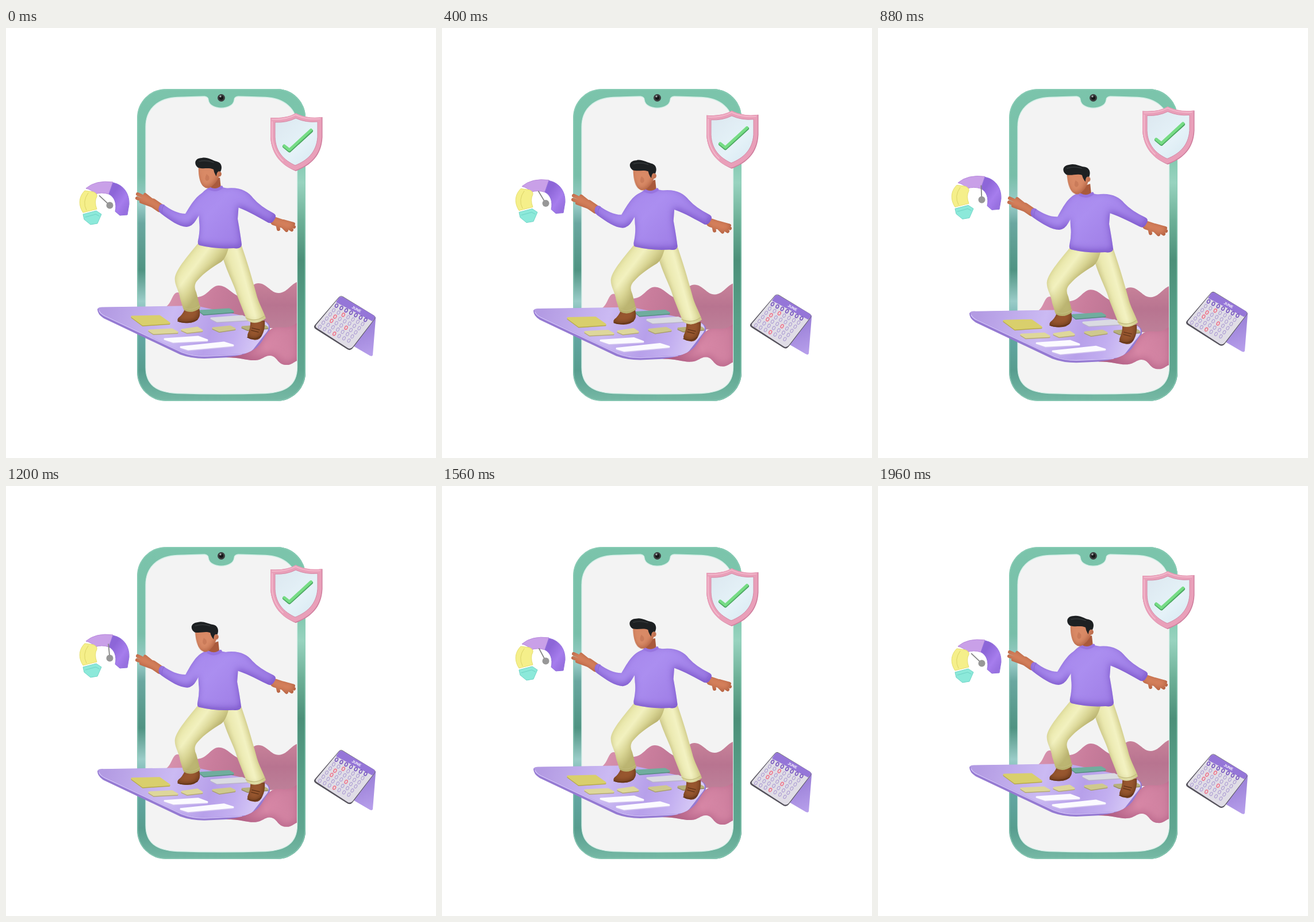
An HTML page that plays this animation: 748x748 px, repeating every 2 s.

```html
<!DOCTYPE html>
<html lang="en">
<head>
<meta charset="utf-8">
<title>Rider on a board</title>
<style>
html, body { margin: 0; width: 100%; height: 100%; overflow: hidden; background: #fff; }
svg { display: block; width: 100%; height: 100%; }
.line { fill: none; stroke-linecap: round; stroke-linejoin: round; }
</style>
</head>
<body>
<svg viewBox="0 0 748 748">
<defs id="defs">
  <clipPath id="rightHalf"><path d="M374 100H530V660H374Z"/></clipPath>
  <path id="screen" d="M298 120.500C266 122 243 139 243 172V590C243 621 262 634 298 635.500Q374 638 451 635.500C487 634 506.500 621 506.500 590V172C506.500 139 483 122 451 120.500L404 119Q397 120 397 125C395 144 354 144 352 125Q352 120 345 119Z"/>
</defs>

<!-- phone -->
<rect id="frame" x="228" y="106" width="293" height="543" rx="50" fill="url(#left)"/>
<use href="#frame" style="fill:url(#right)" clip-path="url(#rightHalf)"/>
<rect x="228" y="106" width="293" height="543" rx="50" fill="url(#right)" clip-path="url(#rightHalf)"/>
<rect x="229" y="107" width="291" height="541" rx="49" class="line" stroke="#8fd0ba"/>
<use href="#screen" fill="#f3f3f3" stroke="#d5efe7" stroke-width="1.300"/>
<circle cx="374.500" cy="121.500" r="6.500" fill="#3b3d3f"/>
<circle cx="374.500" cy="121.500" r="3.600" fill="#151718"/>
<circle cx="373" cy="119" r="1.700" fill="#a3a6a8"/>

<!-- everything that rides the wave -->
<g id="ride">
  <path fill="url(#backWave)" d="M405 468C420 462 426 444 439 444C454 444 461 462 475 461C489 460 494 447 506 442V522H405Z"/>
  <path fill="url(#midWave)" d="M274 487C289 482 288 461 298 460C311 460 322 469 334 468C350 467 357 448 370 448C386 448 394 466 411 468C435 470 445 487 452 506L440 526H300Z"/>
  <path fill="#957ad2" d="M159 489Q160 486 169 486L330 484L445 508Q465 514 457 530L432 565Q424 572 410 572L345 575Q322 575 303 568L170 505Q159 498 159 489Z"/>
  <path fill="url(#board)" d="M160 488Q161 485 170 485.500L330 483L442 507Q462 513 455 527L430 559Q424 566 410 567L345 570Q324 570 306 563L172 500Q161 494 160 488Z"/>
  <path class="line" stroke="#cfbef6" stroke-width="1.600" d="M162 492Q164 497 172 501L306 564Q324 571 345 571L410 568"/>
  <g id="cards"></g>
  <path filter="url(#shadePink)" fill="url(#frontWave)" d="M506 513C491 525 479 519 468 521C452 524 450 544 437 555C424 566 405 571 383 573C408 573 420 579 434 578C447 577 450 569 460 570C472 571 472 585 486 586C497 587 500 581 506 579Z"/>

  <!-- rider -->
  <g filter="url(#shadeBrown)" fill="#98572f">
    <path d="M311 489Q307 499 300 504Q294 512 310 513Q328 515 335 505Q339 499 336 488Z"/>
    <path d="M425 509Q426 520 421 531Q417 541 430 542Q441 545 446 533Q451 523 450 509Z"/>
  </g>
  <path class="line" stroke="#643619" stroke-width="1.500" d="M299 510Q315 515 333 507M420 538Q433 544 444 535M428 522L441 525M427 526L439 529"/>
  <g filter="url(#shadeCream)">
    <path fill="url(#legRight)" d="M370 376C384 428 396 442 402 465L419 508Q434 519 452 505C447 490 439 478 435 461C426 428 419 405 409 376Z"/>
    <path fill="url(#legLeft)" d="M336 372C316 397 298 417 294 433C292 446 301 456 303 471L309 490Q322 499 338 487L331 460Q325 448 333 439C346 424 361 415 374 407Q384 400 389 374Z"/>
  </g>
  <path class="line" stroke="#c2bb7c" stroke-width="1.300" d="M308 486Q322 494 337 483M417 504Q434 513 450 501"/>
  <g class="line" stroke="#d5805c" filter="url(#shadeSkin)">
    <path stroke-width="15" d="M268 313L255 304M467 336L479 340"/>
    <path stroke-width="6" d="M257 302L242 290M253 300L229 289M251 304L228 296M254 309L235 302M482 336L500 341M482 339L501 346M482 342L497 351M479 343L488 352M472 341L474 350"/>
  </g>
  <g id="neck">
    <path fill="#a95a3c" d="M354 266L372 260L374 279Q364 285 355 280Z"/>
  </g>
  <g filter="url(#shadeViolet)" fill="url(#shirt)">
    <path id="torso" d="M352 278Q365 284 376 277L391 280Q403 285 405 306L403 332Q408 360 410 377Q409 385 396 383Q365 385 337 378Q333 377 334 370Q338 351 336 337L334 298Q338 287 352 278Z"/>
    <path id="armLeft" d="M352 283C333 287 324 304 312 323C300 323 287 317 274 307Q268 305 266 312Q264 319 270 323C286 335 300 345 314 346Q324 345 330 335L346 310Z"/>
    <path id="armRight" d="M382 279C406 276 421 284 430 296Q442 310 465 322Q472 326 467 333Q462 342 455 338C432 325 416 316 400 311Z"/>
  </g>
  <g id="collar" class="line" stroke="#9774e0" stroke-width="5"><path d="M354 279Q365 285 375 277"/></g>
  <path class="line" stroke="#8b6ad3" stroke-width="1.200" d="M336 375Q365 382 408 379M275 308Q270 314 272 323M467 325Q459 330 458 338"/>
  <g id="head">
    <g filter="url(#shadeSkin)" fill="#d98a66">
      <path d="M335 239C334 255 337 271 344 276Q350 281 357 276Q366 269 370 260L371 240Z"/>
      <circle cx="370" cy="254" r="4.800"/>
    </g>
    <path fill="#c07252" d="M349 254Q344 263 349 266Q355 265 353 258Z" opacity=".6"/>
    <path fill="#1d2022" d="M334 243C326 237 328 226 341 226C350 224 358 230 366 232C375 234 377 242 373 250Q367 247 366 258Q362 253 361 246C352 242 344 246 334 243Z"/>
    <path class="line" stroke="#34383a" stroke-width="1.500" d="M336 232Q349 229 361 234"/>
  </g>
</g>

<!-- shield -->
<g id="shield">
  <path fill="#cf7f9e" d="M505 148.500Q525 159 550.500 155V190C549 225 527 240 504 249C480 239 462 221 460 190V156Q488 158 505 148.500Z"/>
  <path fill="#e99fb9" d="M504 148Q523 158 549 155V190C547 224 526 239 503 247.500C480 239 462 221 460 190V156Q487 158 504 148Z"/>
  <path fill="url(#glass)" stroke="#d48aa6" d="M504 157Q522 165 542 163V190C540 217 523 231 503 239C484 230 469 216 468 190V164Q488 165 504 157Z"/>
  <path class="line" stroke="#f4bdcf" stroke-width="1.500" d="M463 159Q487 160 504 151Q522 160 546 158M463 163V190C464 207 472 222 482 231"/>
  <path class="line" stroke="#4aa660" stroke-width="6" d="M484 206L493 213.500L531 179"/>
  <path class="line" stroke="#76dc85" stroke-width="5" d="M484 205L493 212L530.500 177.500"/>
</g>

<!-- gauge -->
<g id="gauge">
  <path fill="#c9a0e8" stroke="#b98add" d="M139 279Q156 264 186 268L179 289Q166 285 155 289Q149 281 139 279Z"/>
  <path fill="url(#gaugeViolet)" stroke="#9270dd" d="M186 269C206 273 215 290 214 307L211 325L198 326L190 319C193 306 189 294 179 289Z"/>
  <path fill="#f5ef8a" stroke="#e6df70" d="M137 283L152 285Q159 288 158 293Q153 302 158 315L134 321C125 307 127 293 137 283Z"/>
  <path class="line" stroke="#dcd468" d="M143 287Q132 302 140 317"/>
  <path fill="#8ce9da" stroke="#70d5c7" d="M134 324L157 318L166 324L159 340L147 342L136 333Z"/>
  <path class="line" stroke="#6fd3c5" d="M138 329L156 324L162 327"/>
  <path id="needle" class="line" stroke="#858585" stroke-width="1.800" d="M180.500 308V284"/>
  <circle cx="180.500" cy="308.500" r="6" fill="#979797"/>
</g>

<!-- calendar -->
<g id="calendar">
  <path fill="url(#stand)" d="M642 502Q644 503 643 506L638 569Q637 572 633 570L604 553Z"/>
  <path fill="#55525c" d="M579 468Q582 465 586 467L640 500Q644 503 641 507L603 557Q599 562 594 559L539 524Q534 521 537 517Z"/>
  <path fill="#e0dde6" d="M580 468Q583 466 586 468L640 501Q643 503 640 507L603 555Q599 559 595 557L541 522Q537 520 540 516Z"/>
  <path fill="#9576d8" d="M579 469Q582 466 586 468L640 500Q643 503 640 507L637 510L574 477Z"/>
  <text transform="translate(601 487) rotate(28)" fill="#fff" font-family="'Liberation Sans', Arial, sans-serif" font-size="6.500" font-weight="700">JUNE</text>
  <g id="days" fill="none"></g>
</g>
</svg>

<script>
const $ = id => document.getElementById(id);

// each stop is "offset colour"
const gradient = (id, x1, y1, x2, y2, ...stops) =>
  `<linearGradient id="${id}" gradientUnits="userSpaceOnUse" x1="${x1}" y1="${y1}" x2="${x2}" y2="${y2}">` +
  stops.map(s => { const [at, color] = s.split(' '); return `<stop offset="${at}" stop-color="${color}"/>`; }).join('') +
  '</linearGradient>';

// soft inner shadow, stronger on the side opposite to dx, dy
const shade = (id, color, blur, dx, dy, alpha) =>
  `<filter id="${id}" color-interpolation-filters="sRGB">
    <feGaussianBlur in="SourceAlpha" stdDeviation="${blur}"/><feOffset dx="${dx}" dy="${dy}" result="core"/>
    <feComposite in="SourceAlpha" in2="core" operator="out" result="edge"/>
    <feFlood flood-color="${color}" flood-opacity="${alpha}"/><feComposite in2="edge" operator="in" result="dark"/>
    <feMerge><feMergeNode in="SourceGraphic"/><feMergeNode in="dark"/></feMerge></filter>`;

$('defs').innerHTML +=
  gradient('left', 0, 106, 0, 649, '0 #7bc4ab', '.28 #78bea9', '.37 #9bcdc9', '.43 #6aa7a0', '.58 #4f9382', '.68 #9accc8', '.76 #66a9a8', '.9 #579d8f', '1 #76b9a5') +
  gradient('right', 0, 106, 0, 649, '0 #7bc4ab', '.2 #7cc5ab', '.3 #98d3bf', '.42 #6db097', '.55 #4b8f78', '.75 #57a088', '.9 #5fa690', '1 #76b9a5') +
  gradient('backWave', 0, 444, 0, 520, '0 #c78199', '.5 #b87490', '1 #bd7f98') +
  gradient('midWave', 290, 450, 430, 500, '0 #d792ad', '.5 #c97d9c', '1 #b87290') +
  gradient('frontWave', 400, 570, 500, 530, '0 #b9688d', '.5 #d888a7', '1 #cd7f9e') +
  gradient('board', 180, 470, 450, 560, '0 #b39be3', '.4 #cbbaf3', '.65 #b7a0ea', '.8 #c2aef0', '1 #ddd2f8') +
  gradient('shirt', 290, 280, 400, 385, '0 #a484ea', '.5 #ab8ef0', '1 #9f7ee6') +
  gradient('legRight', 378, 448, 428, 434, '0 #c9c383', '.45 #ebe9b0', '.75 #f3f2c2', '1 #dfdb9c') +
  gradient('legLeft', 308, 412, 349, 443, '0 #e9e7aa', '.35 #f2f1bf', '.7 #d9d594', '1 #bdb673') +
  gradient('glass', 470, 160, 540, 235, '0 #dce8f0', '.6 #e5f2f8', '1 #d7e9f2') +
  gradient('gaugeViolet', 185, 290, 214, 310, '0 #8d66d8', '.6 #a67ded', '1 #9770e0') +
  gradient('stand', 620, 520, 640, 570, '0 #9d83d9', '1 #b8a0ec') +
  shade('shadeViolet', '#6a42bd', 6, -1, -4, .7) +
  shade('shadeCream', '#a9a15c', 5, 0, -2, .5) +
  shade('shadePink', '#a9557c', 7, 2, -4, .6) +
  shade('shadeSkin', '#96462a', 4, -2, -2, .6) +
  shade('shadeBrown', '#4f2810', 4, -1, -3, .7);

const card = (points, fill, side) =>
  `<g stroke-linejoin="round" stroke-width="3"><path d="M${points}Z" transform="translate(0 1.500)" fill="${side}" stroke="${side}"/>
   <path d="M${points}Z" fill="${fill}" stroke="${fill}"/></g>`;
$('cards').innerHTML = [
  ['219 502L267 501L284 513L238 516', '#d9cf6c', '#b6a94c'],
  ['338 492L388 489L395 493L344 497', '#70ad9e', '#548c80'],
  ['357 505L411 501L422 507L367 510', '#dadbe2', '#b9b1cc'],
  ['249 526L289 524L298 529L257 531', '#ded79b', '#b4a875'],
  ['306 525L333 521L341 526L315 529', '#ded79b', '#b4a875'],
  ['360 522L390 519L398 523L371 527', '#cfc98e', '#a99e6f'],
  ['411 520L449 517L455 521L420 524', '#b7b07c', '#93895f'],
  ['276 541L334 537L350 543L291 546', '#fbfaff', '#cfc0ee'],
  ['304 555L379 547L395 552L317 559', '#fbfaff', '#cfc0ee']
].map(c => card(...c)).join('');

const ring = (x, y, color, width) =>
  `<ellipse cx="${x}" cy="${y}" rx="2.200" ry="3.200" transform="rotate(28 ${x} ${y})" stroke="${color}" stroke-width="${width}"/>`;
const marked = ['2,0', '1,1', '1,2', '4,2', '3,4'];
let days = '';
for (let col = 0; col < 7; col++) {
  days += ring(575 + col * 8.4, 483 + col * 4.1, '#7c5cc2', 1.7);
  for (let row = 0; row < 5; row++) {
    const hot = marked.includes(col + ',' + row);
    days += ring(570 + col * 8.4 - row * 6, 491 + col * 4 + row * 7.2, hot ? '#f0748a' : '#ab9ad3', hot ? 1.5 : 1);
  }
}
$('days').innerHTML = days;

const pose = (id, transform) => $(id).setAttribute('transform', transform);
const LOOP = 2000, STEP = 40;

function draw(now) {
  const t = Math.floor(now % LOOP / STEP) * STEP;
  const p = (1 - Math.cos(2 * Math.PI * t / LOOP)) / 2;
  pose('ride', `translate(0 ${7.4 * p})`);
  pose('torso', `translate(${-p} ${382 * .04 * p}) scale(1 ${1 - .04 * p})`);
  pose('armLeft', `rotate(${-2.6 * p} 268 314)`);
  pose('armRight', `rotate(${-2.6 * p} 465 332)`);
  pose('neck', `translate(${-3 * p} ${4 * p})`);
  pose('collar', `translate(${-2 * p} ${4 * p})`);
  pose('head', `translate(${-3.5 * p} ${2.4 * p}) rotate(${-5 * p} 365 278)`);
  pose('shield', `translate(0 ${-12 * p})`);
  pose('gauge', `translate(0 ${-10 * p})`);
  pose('needle', `rotate(${-47 + 46 * p} 180.5 308.5)`);
  pose('calendar', `translate(0 ${-7.6 * p})`);
  requestAnimationFrame(draw);
}
draw(0);
</script>
</body>
</html>
```
